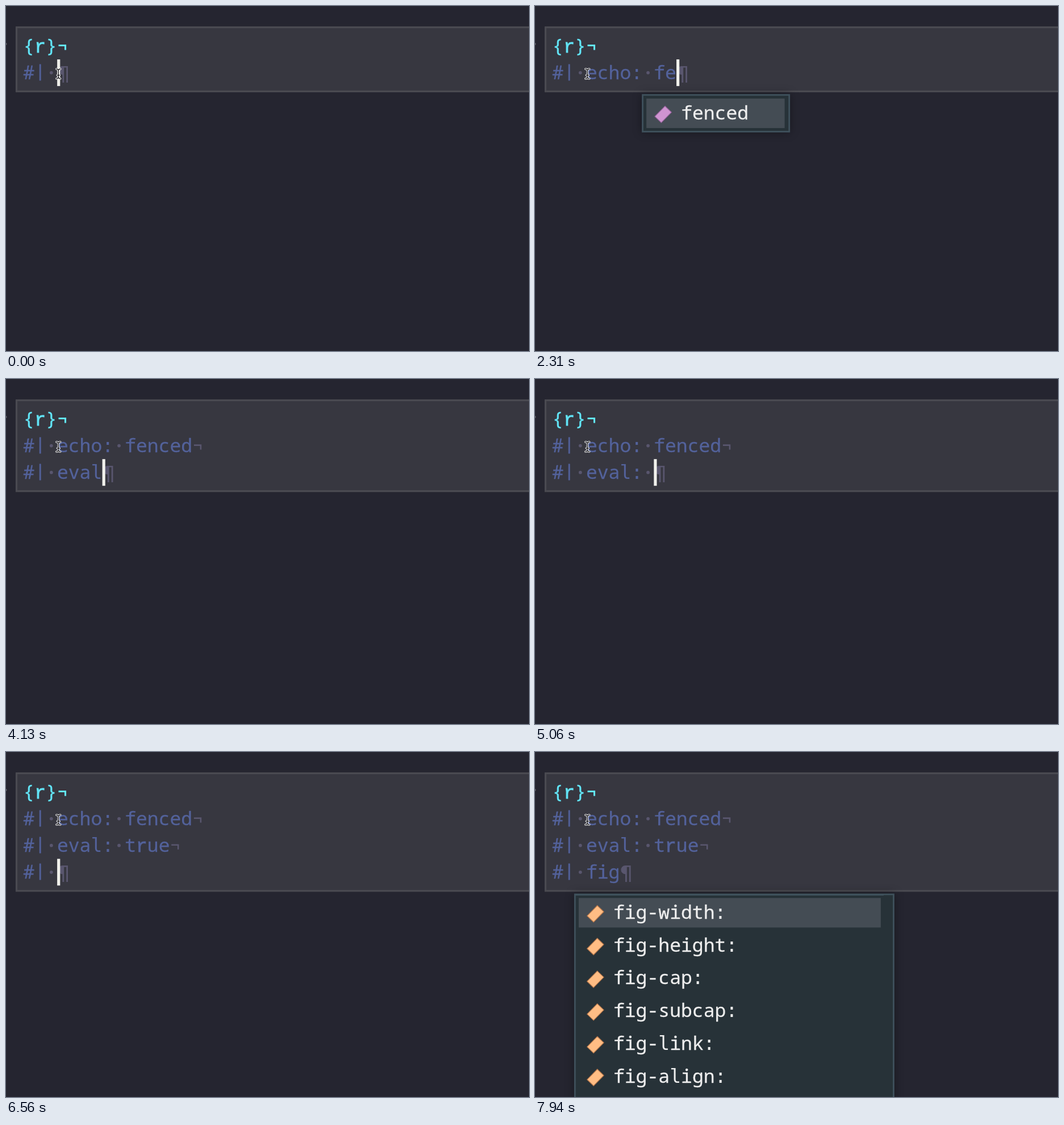
These frames come from a looping animation (921x608 px, 8000 ms). An HTML page:

```html
<!DOCTYPE html>
<html lang="en">
<head>
<meta charset="utf-8">
<title>Cell options</title>
<style>
  html, body { margin: 0; width: 100%; height: 100%; overflow: hidden; background: #252530; }
  svg { display: block; }
  text { font: 33.1px "Noto Sans Mono", monospace; white-space: pre; stroke: currentColor; stroke-width: .3px; }
  .slab { font-family: "Liberation Mono", monospace; stroke-width: .8px; }
  .round { font-family: "DejaVu Sans Mono", monospace; stroke-width: 0; }
  .bar { font-size: 28px; text-anchor: middle; stroke-width: .8px; }
  .head { fill: #62e5f8; color: #62e5f8; }
  .code { fill: #53629b; color: #53629b; }
  .mark { fill: #59566e; }
  .nl { fill: none; stroke: #59566e; stroke-width: 2.6px; }
  .head .nl { stroke: #62e5f8; stroke-width: 3.1px; }
  .menu { fill: #eeeeee; color: #eeeeee; }
  .panel { fill: #273238; stroke: #3f515c; stroke-width: 2.8px; filter: drop-shadow(0 0 8px rgba(0, 0, 0, .36)); }
</style>
</head>
<body>
<svg width="921" height="608" viewBox="0 0 921 608">
  <defs>
    <path id="beam" fill="none" stroke-linecap="round" stroke-linejoin="round"
      d="M88.8 111Q92.3 111 92.3 114Q92.3 111 95.8 111M92.3 114V125M88.8 128Q92.3 128 92.3 125Q92.3 128 95.8 128M90.3 122H94.3"/>
  </defs>
  <rect width="921" height="608" fill="#252530"/>
  <circle cx="-.5" cy="67" r="2" fill="#66666e"/>
  <rect id="cell" x="18.5" y="37.5" width="930" fill="#373740" stroke="#4a4a51" stroke-width="3.2"/>
  <g id="lines"></g>
  <rect id="caret" width="5.2" height="47" fill="#f1f1ec"/>
  <g id="menu" class="menu"></g>
  <use href="#beam" stroke="#f4f4f4" stroke-width="3.4"/>
  <use href="#beam" stroke="#1b1b20" stroke-width="1.4"/>
</svg>
<script>
const LOOP = 8000, LEFT = 30.3, ADV = 19.87, TOP = 47, PITCH = 47.1, ROW = 57.7;
const $ = id => document.getElementById(id);
const colX = c => LEFT + c * ADV;
const lineY = r => TOP + r * PITCH;

// Each edit appends text at its time.
const edits = [
  [-615, '#| '], [500, 'e'], [750, 'c'], [940, 'h'], [1190, 'o'], [1560, ':'], [1750, ' '],
  [1940, 'f'], [2060, 'e'], [2810, 'nced'], [3250, '\n#| '],
  [3810, 'e'], [3940, 'v'], [4060, 'a'], [4130, 'l'], [4690, ':'], [5000, ' '],
  [6130, 'true'], [6440, '\n#| '], [7000, 'f'], [7060, 'i'], [7130, 'g']
];

const pink = ['#cf94d1', '#8f5f96'], orange = ['#ffbd84', '#b5764a'];
const menus = [
  { from: 2250, to: 2810, row: 1, col: 9, width: 261, tint: pink, items: ['fenced'] },
  { from: 5250, to: 6130, row: 2, col: 9, width: 241.5, tint: pink, items: ['true', 'false'] },
  { from: 7250, to: LOOP, row: 3, col: 3, width: 564, tint: orange, scroll: true,
    items: ['width', 'height', 'cap', 'subcap', 'link', 'align', 'env'].map(s => `fig-${s}:`) }
];

const glyphs = s => s.replace(/[rl:]/g, c => `<tspan class="${c === 'r' ? 'slab' : 'round'}">${c}</tspan>`);
const label = (s, x, y) => `<text x="${x}" y="${y}">${glyphs(s)}</text>`;

const marks = {
  ' ': (x, y) => `<circle class="mark" cx="${x + 9.8}" cy="${y + 23.5}" r="2.9"/>`,
  '|': (x, y) => `<text class="bar" x="${x + 9.9}" y="${y + 29.5}">|</text>`,
  '¬': (x, y) => `<path class="nl" d="M${x + 2.6} ${y + 22.5}h12v8"/>`,
  '¶': (x, y) => `<path class="mark" d="M${x + 9.5} ${y + 27}a7.6 7.6 0 0 1 0 -15.2h9.6v29h-2.8v-26.4h-4v26.4h-2.8z"/>`
};

function drawLine(s, row, cls) {
  const y = lineY(row);
  let out = '';
  for (const m of s.matchAll(/[ |¬¶]|[^ |¬¶]+/g)) {
    const x = colX(m.index), mark = marks[m[0]];
    out += mark ? mark(x, y) : label(m[0], x, y + 34.6);
  }
  return `<g class="${cls}">${out}</g>`;
}

function drawMenu(m) {
  const x = colX(m.col) - 21, y = lineY(m.row) + 61.2, n = m.items.length;
  let out = `<rect class="panel" x="${x + 1.4}" y="${y + 1.4}" width="${m.width - 2.8}" height="${n * ROW + 7}"/>`;
  if (m.scroll) out += `<path d="M${x + 2} ${y + 3}H614" stroke="#3f515c"/>`;
  out += `<rect x="${x + 8}" y="${y + 7.8}" width="${m.scroll ? 532 : m.width - 17.5}" height="52" fill="#444c54"/>`;
  m.items.forEach((s, i) => {
    const cy = y + 34 + i * ROW;
    out += `<path d="M${x + 40.8} ${cy - 13}l11.4 11l-18 18.3l-11.4 -11z" fill="${m.tint[0]}" stroke="${m.tint[1]}" stroke-width="1.2" stroke-linejoin="round"/>`;
    out += label(s, x + 69, cy + 10.5);
  });
  return out;
}

// Solid after an edit, then a smooth half-second fade each way.
function caretAlpha(age) {
  if (age < 500) return 1;
  const p = (age - 500) % 1000;
  const k = Math.min(1, Math.max(0, (Math.min(p, 1000 - p) - 100) / 200));
  return 1 - k * k * (3 - 2 * k);
}

let shownText, shownMenu;
function render(t) {
  const past = edits.filter(e => e[0] <= t);
  const text = past.map(e => e[1]).join('');
  const lines = text.split('\n'), last = lines.length - 1;
  if (text !== shownText) {
    shownText = text;
    $('lines').innerHTML = drawLine('{r}¬', 0, 'head') +
      lines.map((s, i) => drawLine(s + (i < last ? '¬' : '¶'), i + 1, 'code')).join('');
    $('cell').setAttribute('height', 113 + last * PITCH);
    $('caret').setAttribute('x', colX(lines[last].length) + .2);
    $('caret').setAttribute('y', lineY(last + 1));
  }
  $('caret').setAttribute('opacity', caretAlpha(t - past[past.length - 1][0]));
  const menu = menus.find(m => t >= m.from && t < m.to);
  if (menu !== shownMenu) {
    shownMenu = menu;
    $('menu').innerHTML = menu ? drawMenu(menu) : '';
  }
}

const start = performance.now();
function tick() {
  render((performance.now() - start) % LOOP);
  requestAnimationFrame(tick);
}
tick();
</script>
</body>
</html>
```
